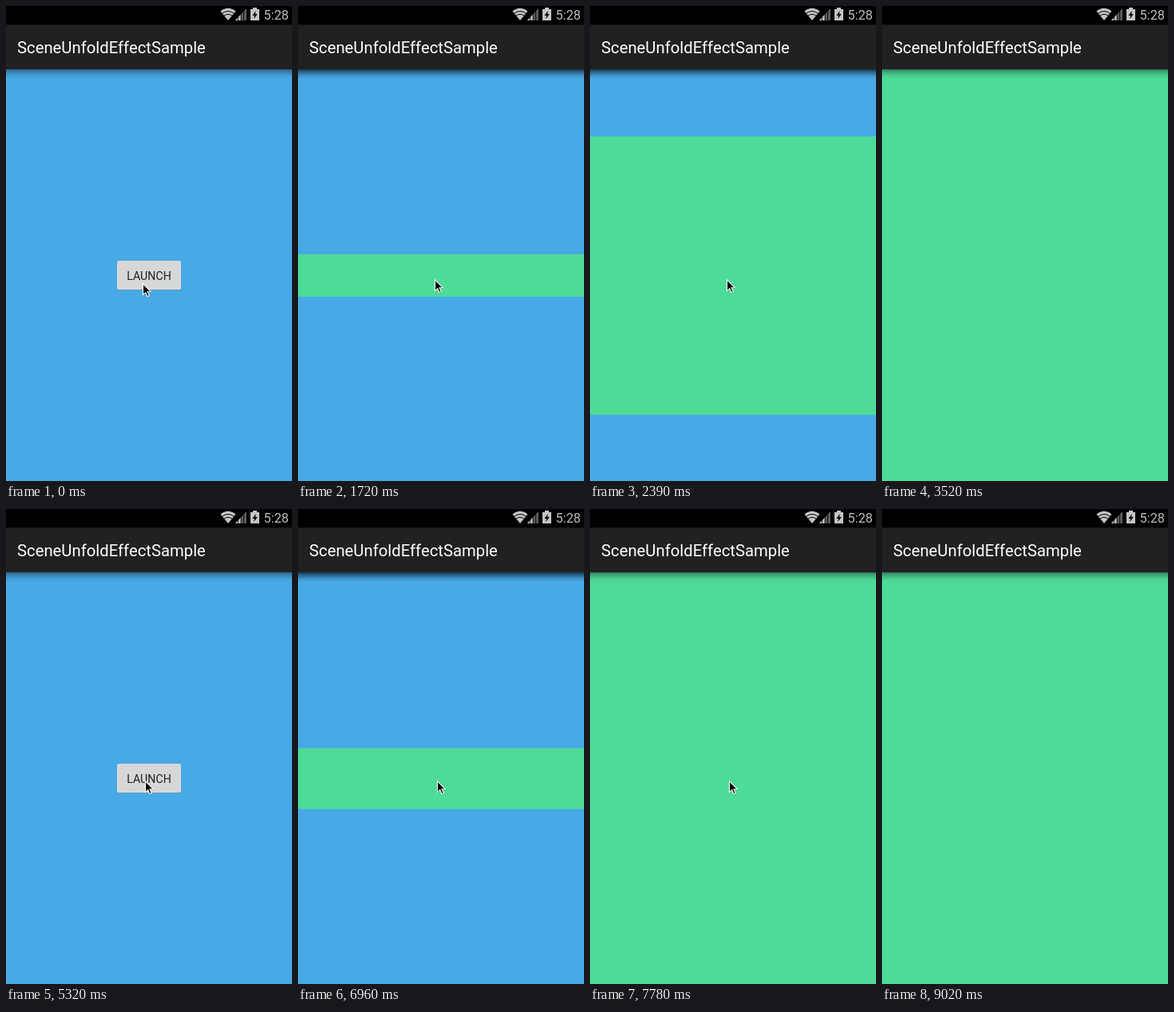
These frames come from a looping animation (358x593 px, 9.5 s). An HTML page:

```html
<!DOCTYPE html>
<html lang="en">
<head>
<meta charset="utf-8">
<title>Screen transition</title>
<style>
  html, body { margin: 0; width: 100%; height: 100%; overflow: hidden; background: #000; }
  svg { display: block; }
  text { font-family: Roboto, sans-serif; }
</style>
</head>
<body>
<svg width="358" height="593" viewBox="0 0 358 593">
  <defs>
    <linearGradient id="shade" x2="0" y2="1">
      <stop offset="0" stop-opacity=".42"/>
      <stop offset=".3" stop-opacity=".22"/>
      <stop offset=".65" stop-opacity=".07"/>
      <stop offset="1" stop-opacity="0"/>
    </linearGradient>
  </defs>

  <rect y="79" width="358" height="514" fill="#47a9e5"/>
  <g id="button">
    <rect x="139" y="318.7" width="80" height="36.3" rx="2" fill="#000" opacity=".2"/>
    <rect id="face" x="139" y="318" width="80" height="36.3" rx="2"/>
    <text x="179" y="342" font-size="14.2" text-anchor="middle" fill="#202020">LAUNCH</text>
  </g>
  <rect id="band" width="358" fill="#4edb97"/>

  <!-- each of the two screens casts its own shadow while both are shown -->
  <rect y="79" width="358" height="12" fill="url(#shade)"/>
  <rect id="shade2" y="79" width="358" height="12" fill="url(#shade)"/>
  <rect width="358" height="23.5"/>
  <rect y="23.3" width="358" height="55.7" fill="#212121"/>
  <text x="14" y="59" font-size="20.3" fill="#fff">SceneUnfoldEffectSample</text>

  <!-- status icons -->
  <path d="M278 18L268.5 6.5Q278 -1 287.5 6.5Z" fill="#c4c4c4"/>
  <path d="M270 9.6Q278 3.4 286 9.6M272.5 12.4Q278 8.2 283.5 12.4" fill="none" stroke="#000" stroke-width="1"/>
  <path d="M287 18L301 3V18Z" fill="#5c5c5c"/>
  <path d="M287 18L294 10.5V18Z" fill="#c4c4c4"/>
  <path d="M290.6 8V18M294.1 5V18M297.6 3V18" stroke="#000" stroke-width=".8"/>
  <path d="M309 2h5v2h3v14h-11v-14h3z" fill="#c4c4c4"/>
  <path d="M312.8 6L308.5 12H311L310.3 16L314.8 10H312.2Z"/>
  <text x="354" y="17" font-size="16.3" text-anchor="end" fill="#bcbcbc">5:28</text>

  <g id="cursor">
    <path d="M.5 1.5V16L3.9 13L6.2 18.2L8.7 17.1L6.4 12H11Z" fill="#000" opacity=".25"/>
    <path d="M.5 .8V14.6L3.8 11.6L6 16.8L8.3 15.8L6.1 10.7H10.3Z" stroke="#fff" stroke-width="1.1"/>
  </g>
</svg>
<script>
const LOOP = 9500, MID = 336.5, FULL = 257, FIRST = 26.5;
const $ = id => document.getElementById(id);
const band = $('band'), button = $('button'), face = $('face');
const shade2 = $('shade2'), cursor = $('cursor');
const mix = (a, b, p) => a + (b - a) * p;
const part = (t, from, to) => Math.min(1, Math.max(0, (t - from) / (to - from)));
const show = (el, on) => el.setAttribute('visibility', on ? 'visible' : 'hidden');

// Half the height of the green screen as it unfolds
function halfHeight(t) {
  if (t < 1720) return 0;
  if (t < 4240) return mix(FIRST, FULL, part(t, 1720, 2630) ** 1.47);
  if (t < 6630) return 0;
  if (t < 7570) return mix(FIRST, 186.5, part(t, 6630, 7570) ** 2.53);
  return mix(186.5, FULL, part(t, 7570, 7780));
}

// Tip of the pointer, or null while it is off the stage
function pointer(t) {
  const move = (x0, y0, x1, y1, p) => [mix(x0, x1, p), mix(y0, y1, p)];
  if (t < 1160) return [171, 346];
  if (t < 1220) return [171, 343];
  if (t < 3520) return move(171, 341, 84, 592, part(t, 3000, 3520) ** 1.5);
  if (t < 4690) return null;
  if (t < 8500) return move(93, 589, 174, 339, 1 - (1 - part(t, 4690, 5320)) ** 1.8);
  if (t < 9020) return move(174, 339, 271, 592, part(t, 8500, 9020) ** 1.5);
  return null;
}

function draw(t) {
  const half = halfHeight(t), tip = pointer(t);
  const pressed = (t >= 1430 && t < 1520) || (t >= 6480 && t < 6630);
  band.setAttribute('y', MID - half);
  band.setAttribute('height', half * 2);
  face.setAttribute('fill', pressed ? '#bcbdbd' : '#d6d7d7');
  show(button, !half);
  show(shade2, half && half < FULL);
  show(cursor, tip);
  if (tip) cursor.setAttribute('transform', `translate(${tip})`);
}

const start = performance.now();
function tick() {
  draw((performance.now() - start) % LOOP);
  requestAnimationFrame(tick);
}
tick();
</script>
</body>
</html>
```
